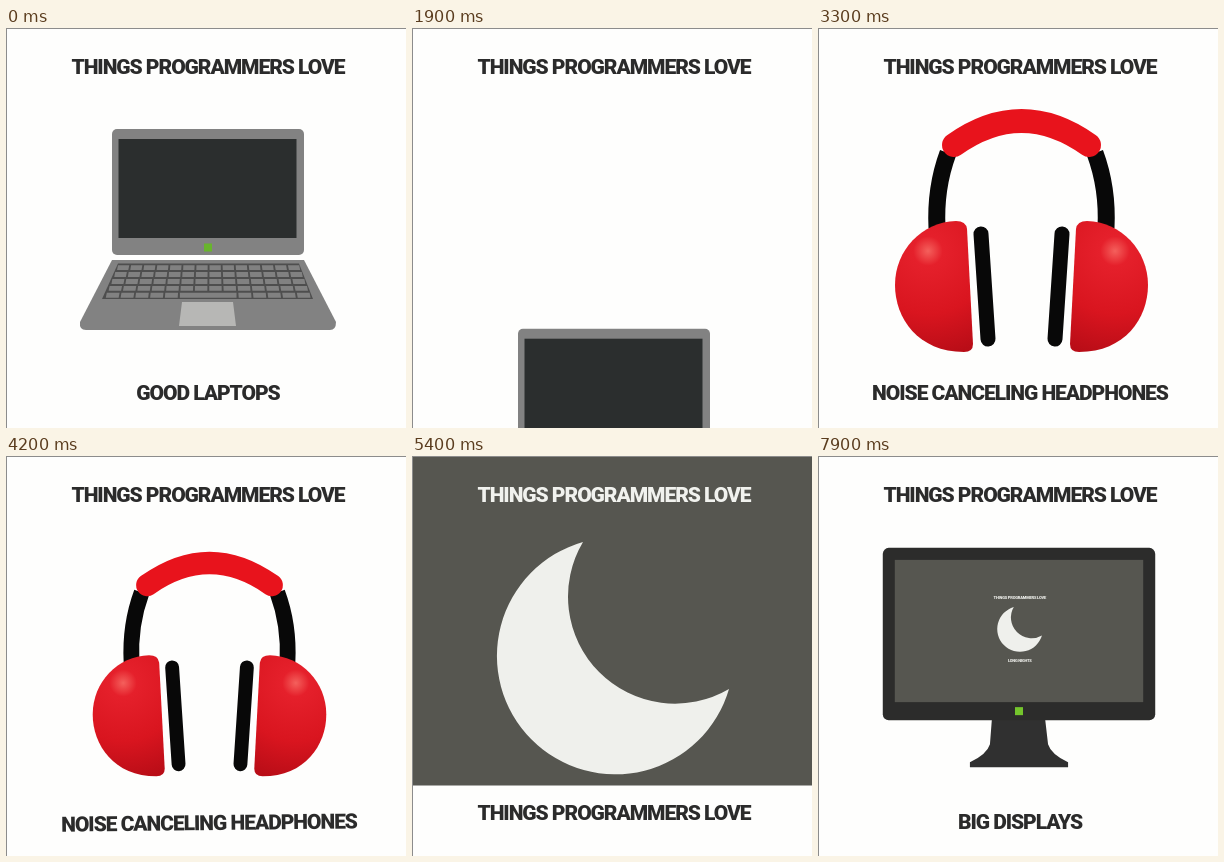
Write an HTML page that moves like this. It is 400 by 400 pixels and loops after 8 s.

```html
<!DOCTYPE html>
<html>
<head>
<meta charset="utf-8">
<style>
html, body { margin: 0; width: 100%; height: 100%; overflow: hidden; background: #fefefd; }
svg { display: block; width: 100vw; height: 100vh; }
text { font: 900 21px Roboto, "Open Sans", sans-serif; letter-spacing: -1.05px; text-anchor: middle; fill: #2b2b2b; }
.light text { fill: #f1f2ee; }
</style>
</head>
<body>
<svg viewBox="0 0 400 400">
  <defs>
    <radialGradient id="red" gradientUnits="userSpaceOnUse" cx="110" cy="223" r="105">
      <stop offset="0" stop-color="#f4605c"/>
      <stop offset=".14" stop-color="#e5202b"/>
      <stop offset=".6" stop-color="#d9151f"/>
      <stop offset="1" stop-color="#b90d17"/>
    </radialGradient>
    <clipPath id="drop"><rect id="dropBox" width="400" height="400"/></clipPath>
    <g id="ear">
      <path d="M130 125Q117 160 119 200" fill="none" stroke="#080808" stroke-width="17"/>
      <path d="M138 193Q148 193 149 201L155 316Q155 324 146 324C100 324 77 290 77 257C77 222 104 194 138 193Z" fill="url(#red)"/>
      <path d="M163 206L170 311" stroke="#080808" stroke-width="15" stroke-linecap="round"/>
    </g>
  </defs>

  <text id="title" x="202" y="46">THINGS PROGRAMMERS LOVE</text>
  <text id="good" x="202" y="371.5">GOOD LAPTOPS</text>
  <text id="noise" x="202" y="371.5">NOISE CANCELING HEADPHONES</text>
  <text id="big" x="202" y="372.5">BIG DISPLAYS</text>

  <g id="laptop">
    <rect x="106" y="101" width="192" height="126" rx="5" fill="#828282"/>
    <rect x="112.5" y="111" width="178" height="99" fill="#2b2e2e"/>
    <rect x="198" y="215.5" width="8" height="8" fill="#68b52c"/>
    <path d="M106 232H298L330 294Q330 302 324 302H80Q73 302 74 294Z" fill="#828282"/>
    <path d="M112 235.500H293L307 271H96Z" fill="#4e4e4e"/>
    <g id="keys" fill="#818181"></g>
    <path d="M176 274H227L230 298H173Z" fill="#b7b7b5"/>
  </g>

  <g id="phones">
    <use href="#ear"/>
    <use href="#ear" transform="matrix(-1 0 0 1 407 0)"/>
    <path d="M136 117Q203.500 69 271 117" fill="none" stroke="#e8131c" stroke-width="24" stroke-linecap="round"/>
  </g>

  <g id="monitor">
    <path d="M174 262H227L230 288Q233 298 250 306V311H152V306Q169 298 172 288Z" fill="#303030"/>
    <rect x="65" y="92" width="272" height="172" rx="6" fill="#2c2c2b"/>
    <rect x="77" y="104" width="248" height="142" fill="#565650"/>
    <rect x="197" y="251" width="8" height="8" fill="#74c52c"/>
  </g>

  <g id="night" clip-path="url(#drop)">
    <rect id="sky" width="400" height="400" fill="#565650"/>
    <g id="scene" class="light">
      <text x="202" y="46">THINGS PROGRAMMERS LOVE</text>
      <path d="M171 86A118.400 118.400 0 1 0 317 233A107 107 0 0 1 171 86Z" fill="#eff0ec"/>
      <text id="long" x="202" y="372">LONG NIGHTS</text>
    </g>
  </g>
  <path d="M0 .5H400M.5 0V400" stroke="#8c8c8c"/>
</svg>
<script>
const LOOP = 8000;
const el = id => document.getElementById(id);
const ramp = (t, from, to) => Math.min(1, Math.max(0, (t - from) / (to - from)));
const mix = (a, b, p) => a + (b - a) * p;
const inOut = p => p < .5 ? 4 * p ** 3 : 1 - 4 * (1 - p) ** 3;
const out = p => 1 - (1 - p) ** 3;
const backOut = p => 1 + 2.2 * (p - 1) ** 3 + 1.2 * (p - 1) ** 2;
const place = (id, value) => el(id).setAttribute('transform', value);
const show = (id, on) => el(id).style.display = on ? '' : 'none';
const scaleAt = (x, y, s) => `translate(${x} ${y}) scale(${s}) translate(${-x} ${-y})`;

// Keyboard rows widen toward the front edge.
let keys = '';
for (let row = 0; row < 5; row++) {
  const y = 236.5 + row * 6.9, left = 111 - row * 2.8, width = 183 + row * 5.4;
  const count = 14, step = width / count;
  for (let i = 0; i < count; i++) {
    if (row === 4 && i > 4 && i < 9) continue;
    const x = left + i * step + 1;
    keys += `M${x} ${y + .7}h${step - 1.8}l${(i - 6.5) * .15} 4.900h${1.8 - step}z`;
  }
  if (row === 4) keys += `M${left + 5 * step + 1} ${y + .7}h${4 * step - 1.8}v4.900h${1.8 - 4 * step}z`;
}
el('keys').innerHTML = `<path d="${keys}"/>`;

function draw(t) {
  // Laptop swells, then drops away
  const swell = 1 + .05 * Math.sin(Math.PI * ramp(t, 1100, 1640));
  const fall = .003 * Math.max(0, t - 1643) ** 2;
  show('laptop', t < 2150);
  place('laptop', `translate(0 ${fall}) ${scaleAt(202, 202, swell)}`);
  show('good', t < 1850);
  place('good', `translate(${300 * ramp(t, 1350, 1800) ** 2} 0)`);

  // Headphones pop in and shrink out
  const leave = ramp(t, 4050, 4500);
  const size = backOut(ramp(t, 2100, 2700)) * (1 - leave ** 2.35);
  show('phones', t > 2100 && t < 4500);
  place('phones', scaleAt(203.5, leave ? 275 : 203, Math.max(0, size)));
  show('noise', t > 2100 && t < 4600);
  const slide = -370 * (1 - out(ramp(t, 2100, 2700)));
  const tip = leave ** 4;
  place('noise', `translate(${slide + 80 * tip} ${200 * tip}) rotate(${-50 * tip} 202 364)`);

  // Night panel drops and pushes the title down
  const edge = 400 * inOut(ramp(t, 5000, 5620));
  const zoom = inOut(ramp(t, 7100, 7950));
  const display = t > 7100;
  el('dropBox').setAttribute('height', edge);
  show('night', t > 5000);
  show('sky', !display);
  place('title', `translate(0 ${display ? 0 : Math.max(0, edge - 11)})`);
  place('long', `translate(0 ${60 * (1 - out(ramp(t, 5600, 6100)))})`);

  // Night scene shrinks onto the monitor
  place('scene', `translate(${163 * zoom} ${134.6 * zoom}) scale(${mix(1, .192, zoom)})`);
  const s = mix(3.2, 1, zoom);
  show('monitor', display);
  show('big', display);
  place('monitor', `translate(${201 * (1 - s)} ${-370 * (1 - zoom)}) scale(${s})`);
}

const start = performance.now();
function tick() {
  draw((performance.now() - start) % LOOP);
  requestAnimationFrame(tick);
}
tick();
</script>
</body>
</html>
```
